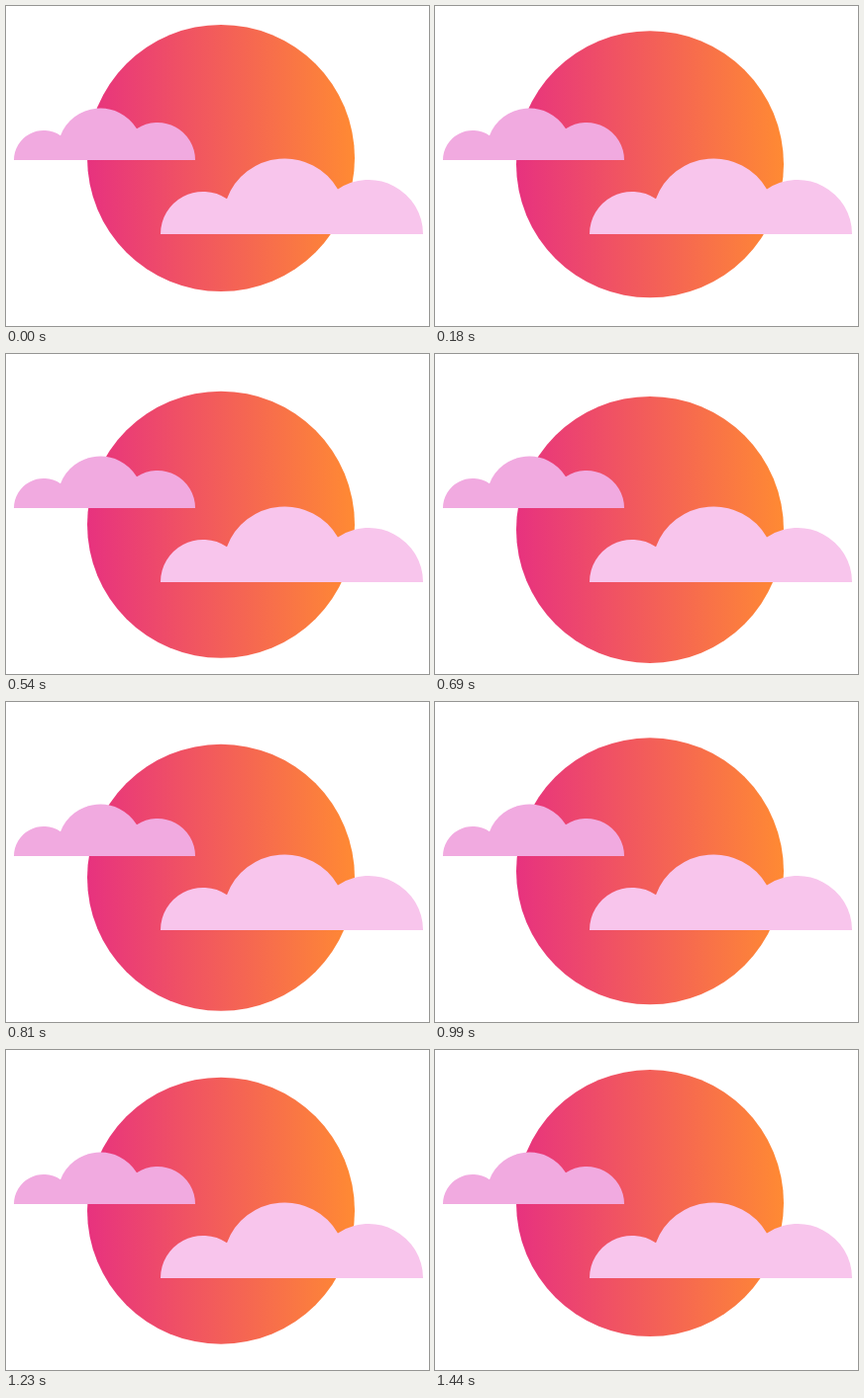
An HTML page for the animation above (1470 ms loop, 427 by 324 pixels).

```html
<!DOCTYPE html>
<html lang="en">
<head>
<meta charset="utf-8">
<title>Sun behind clouds</title>
<style>
  html, body { margin: 0; width: 100%; height: 100%; overflow: hidden; background: #fff; }
  svg { display: block; width: 427px; height: 324px; }
</style>
</head>
<body>
<svg viewBox="0 0 427 324">
  <defs>
    <linearGradient id="glow">
      <stop offset="0" stop-color="#e7327f"/>
      <stop offset="1" stop-color="#ff8a33"/>
    </linearGradient>
  </defs>
  <circle id="sun" cx="217" cy="154" r="135" fill="url(#glow)"/>
  <path fill="#f1aae0" d="M8 156A30 30 0 0 1 55 131.3A43 43 0 0 1 132 124.3A38 38 0 0 1 191 156Z"/>
  <path fill="#f8c5ec" d="M156 231A43 43 0 0 1 223 195.3A62 62 0 0 1 335 185.6A55 55 0 0 1 421 231Z"/>
</svg>
<script>
  const LOOP = 1470, STEP = 30, TURN = 750, TOP = 154, DROP = 26;
  const sun = document.getElementById('sun');

  // Linear fall until TURN, then linear rise back to the start.
  function draw() {
    const t = Math.floor(performance.now() % LOOP / STEP) * STEP;
    const depth = t < TURN ? t / TURN : (LOOP - t) / (LOOP - TURN);
    sun.setAttribute('cy', TOP + DROP * depth);
    requestAnimationFrame(draw);
  }
  draw();
</script>
</body>
</html>
```
